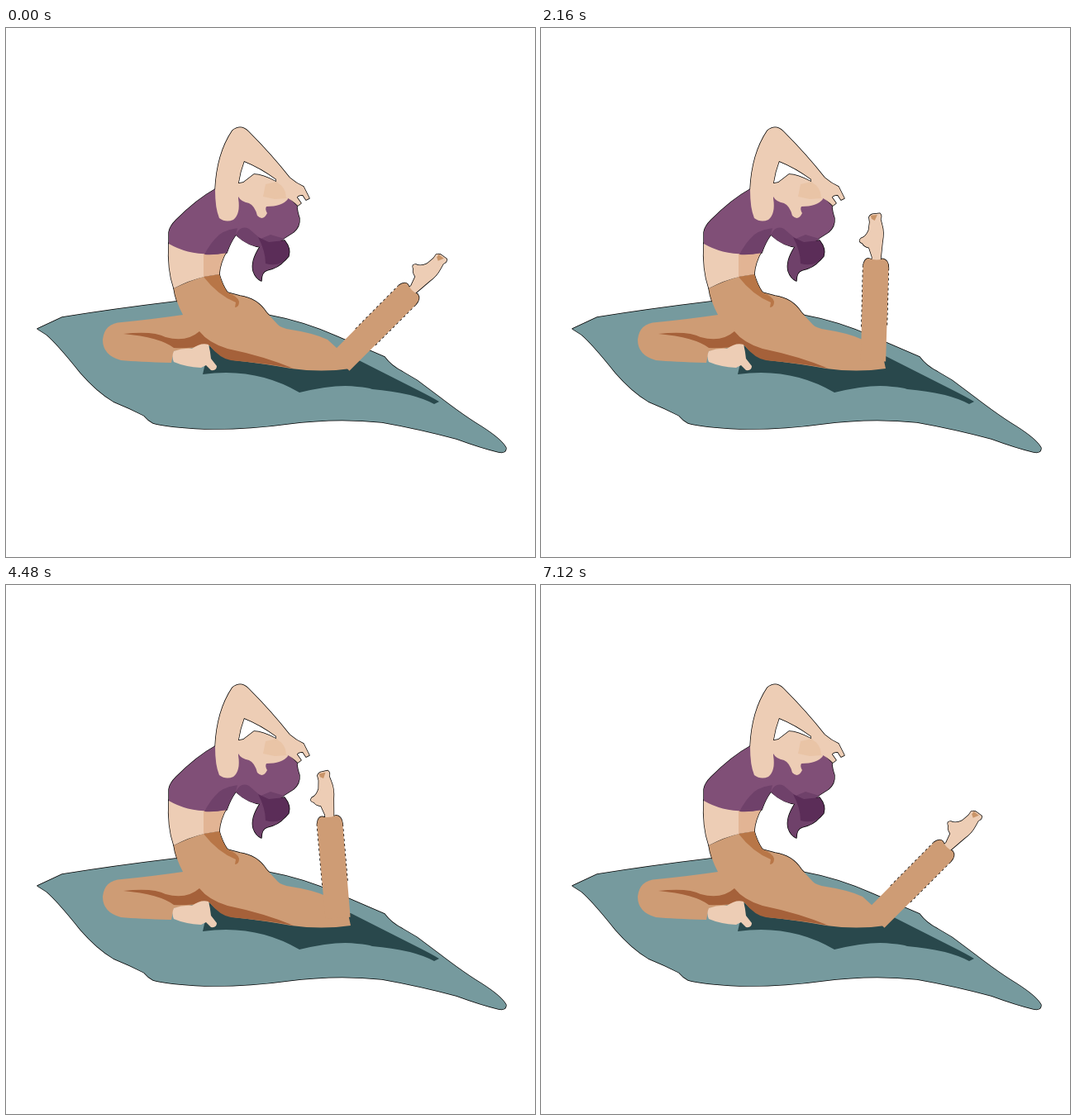
An HTML page with a canvas that plays this animation: 640x640 px, repeating every 8.4 s.

```html
<!DOCTYPE html>
<html lang="en">
<head>
<meta charset="utf-8">
<title>Yoga stretch</title>
<style>
html, body { margin: 0; width: 100%; height: 100%; overflow: hidden; background: #fff; }
canvas { display: block; width: 100vmin; height: 100vmin; }
</style>
</head>
<body>
<canvas id="stage" width="640" height="640"></canvas>
<script>
const ctx = document.getElementById('stage').getContext('2d');
const LOOP = 8400, STEP = 40;
const KNEE = [402, 407];

const color = {
  mat: '#769a9e', shadow: '#29484c',
  pants: '#ce9c75', fold: '#a5613a', hip: '#b87647',
  skin: '#edcdb5', skinDark: '#e2b494', cheek: '#e9c4a6', toe: '#c99468',
  top: '#804f77', topDark: '#6f416a', bun: '#5b2d58'
};

const shape = Object.fromEntries(Object.entries({
  mat: 'M38 364L68 350Q130 340 205 331L316 347Q360 355 400 373L458 398Q466 409 480 416L497 426L525 447Q555 470 575 482Q600 498 605 508Q605 515 596 513Q575 508 545 497Q500 485 455 477Q400 471 340 479Q290 486 240 485Q195 483 178 478Q172 475 167 469Q150 460 130 452Q110 440 90 417Q62 382 49 371L38 364Z',
  shadow: 'M246 384L238 419Q302 410 355 441Q400 430 425 434Q438 435 443 437Q492 441 518 455L524 452Q514 446 500 439L417 397L300 390Z',
  pants: 'M203 315Q224 305 239 301L258 298Q262 312 268 320L283 324Q304 327 315 344L329 359Q333 363 345 365Q372 369 389 377L400 387L414 398L417 412Q382 417 345 412Q312 406 275 402Q258 398 246 384L203 391L200 405Q160 404 139 402Q117 396 117 377Q119 357 140 356Q180 352 214 347Q205 330 203 315Z',
  fold: 'M142 370Q178 366 193 374Q218 381 234 367Q245 381 268 388Q312 397 348 412Q316 406 272 402Q259 400 246 384Q220 388 203 387Q186 374 142 370Z',
  hip: 'M239 301L258 298Q262 312 268 320Q281 325 282 331Q282 338 277 338L278 332Q256 323 239 301Z',
  restFoot: 'M203 391Q214 387 225 388Q236 380 245 383Q247 390 248 400L255 409Q255 415 248 414L242 408L236 411Q217 410 203 404Q200 397 203 391Z',
  belly: 'M197 260Q195 292 203 315Q222 305 240 301V272Z',
  waist: 'M239 272L267 270Q259 284 258 298L239 301Z',
  top: 'M197 261V247Q198 240 206 232Q231 207 253 195L283 200L290 240L278 250Q271 260 267 272Q226 278 197 261Z',
  topShade: 'M240 274Q248 259 258 250Q270 241 290 242L278 250Q271 260 267 272Q252 275 240 274Z',
  hair: 'M278 250Q285 228 283 203L342 205L352 215Q352 221 355 230Q356 240 348 247L337 254L322 264Q300 270 278 250Z',
  hairShade: 'M278 250Q284 238 294 243L308 255L320 250L337 255L322 264Q294 268 278 250Z',
  tail: 'M307 265Q296 282 299 294Q302 303 309 306Q309 295 316 293Q330 290 337 281L322 262Z',
  bun: 'M305 253L318 259L337 257Q345 267 342 276Q332 290 314 285Q314 270 305 253Z',
  head: 'M281 188L287 187L300 177Q310 177 327 186L340 190L341 207Q334 216 315 216Q313 219 316 224Q311 234 304 227Q301 215 294 212Q284 210 281 204Z',
  cheek: 'M314 189L327 186L337 193L340 206L325 207L311 204Z',
  arms: 'M253 196Q255 152 274 124Q284 116 293 125Q321 153 343 181Q351 188 360 192L367 206L363 208L359 202Q353 202 352 205L357 212L353 215Q346 208 339 205Q339 193 327 186L327 183Q308 169 288 161Q283 174 281 188V206Q284 225 275 232Q266 236 258 230Q253 218 253 196Z',
  shin: 'M-15.3 -4L-15.6 -119Q-14 -128 -9 -128Q0 -125 8 -128Q15 -127 15.3 -117L15 -4Z',
  sides: 'M-15.4 -45L-15.6 -119M15.3 -117L15.2 -45',
  cuff: 'M-15.6 -119Q-14 -128 -9 -128Q0 -125 8 -128Q15 -127 15.3 -117',
  foot: 'M-5 -122L-5 -130L-9 -141Q-15 -142 -17 -146Q-23 -148 -19 -152Q-13 -154 -10 -162L-9 -172L-10 -178Q-8 -182 -4 -182L3 -183Q6 -180 4 -176L6 -169Q9 -160 7 -148L5 -122Z',
  toe: 'M-8 -180L0 -181L-3 -174L-7 -176Z'
}).map(([name, d]) => [name, new Path2D(d)]));

const tint = {
  restFoot: 'skin', belly: 'skin', head: 'skin', arms: 'skin', foot: 'skin',
  waist: 'skinDark', topShade: 'topDark', hair: 'top', hairShade: 'topDark',
  tail: 'topDark', shin: 'pants'
};

// time in ms, lean of the shin in degrees
const keys = [
  [200, 44.9], [820, 38], [1080, 29.3], [1520, 14.8], [1960, 5.1], [2840, -7.7],
  [3500, -10.5], [4480, -4.9], [5480, 9.5], [5640, 11.9], [6360, 34.8], [6480, 38.4], [7120, 44.9]
];

const slope = (a, b) => (b[1] - a[1]) / (b[0] - a[0]);

// Tangent that never overshoots its neighbours
function tangent(i) {
  if (i === 0 || i === keys.length - 1) return 0;
  const a = slope(keys[i - 1], keys[i]), b = slope(keys[i], keys[i + 1]);
  return a * b <= 0 ? 0 : 2 * a * b / (a + b);
}

function lean(t) {
  const last = keys.length - 1;
  if (t <= keys[0][0] || t >= keys[last][0]) return keys[0][1];
  const i = keys.findIndex(k => k[0] > t) - 1;
  const [t0, v0] = keys[i], [t1, v1] = keys[i + 1];
  const h = t1 - t0, u = (t - t0) / h, w = 1 - u;
  return v0 * w * w * (1 + 2 * u) + v1 * u * u * (3 - 2 * u)
    + h * u * w * (tangent(i) * w - tangent(i + 1) * u);
}

function fill(...names) {
  for (const name of names) {
    ctx.fillStyle = color[name] || color[tint[name]];
    ctx.fill(shape[name]);
  }
}

function outline(...names) {
  for (const name of names) ctx.stroke(shape[name]);
}

function drawShin(angle) {
  ctx.save();
  ctx.translate(...KNEE);
  ctx.rotate(angle * Math.PI / 180);
  outline('foot', 'cuff');
  ctx.setLineDash([3, 3]);
  outline('sides');
  fill('foot', 'toe', 'shin');
  ctx.restore();
}

function draw(t) {
  ctx.fillStyle = '#fff';
  ctx.fillRect(0, 0, 640, 640);
  ctx.strokeStyle = '#000';
  ctx.lineWidth = 1.4;
  ctx.lineJoin = 'round';
  outline('mat', 'pants', 'belly', 'waist', 'top', 'hair', 'tail', 'bun', 'head', 'arms');
  fill('mat', 'shadow', 'pants', 'fold', 'hip', 'restFoot');
  fill('belly', 'waist', 'top', 'topShade', 'hair', 'hairShade', 'tail', 'bun');
  fill('head', 'cheek', 'arms');
  drawShin(lean(t));
}

const start = performance.now();
function tick() {
  const t = (performance.now() - start) % LOOP;
  draw(Math.floor(t / STEP) * STEP);
  requestAnimationFrame(tick);
}
tick();
</script>
</body>
</html>
```
